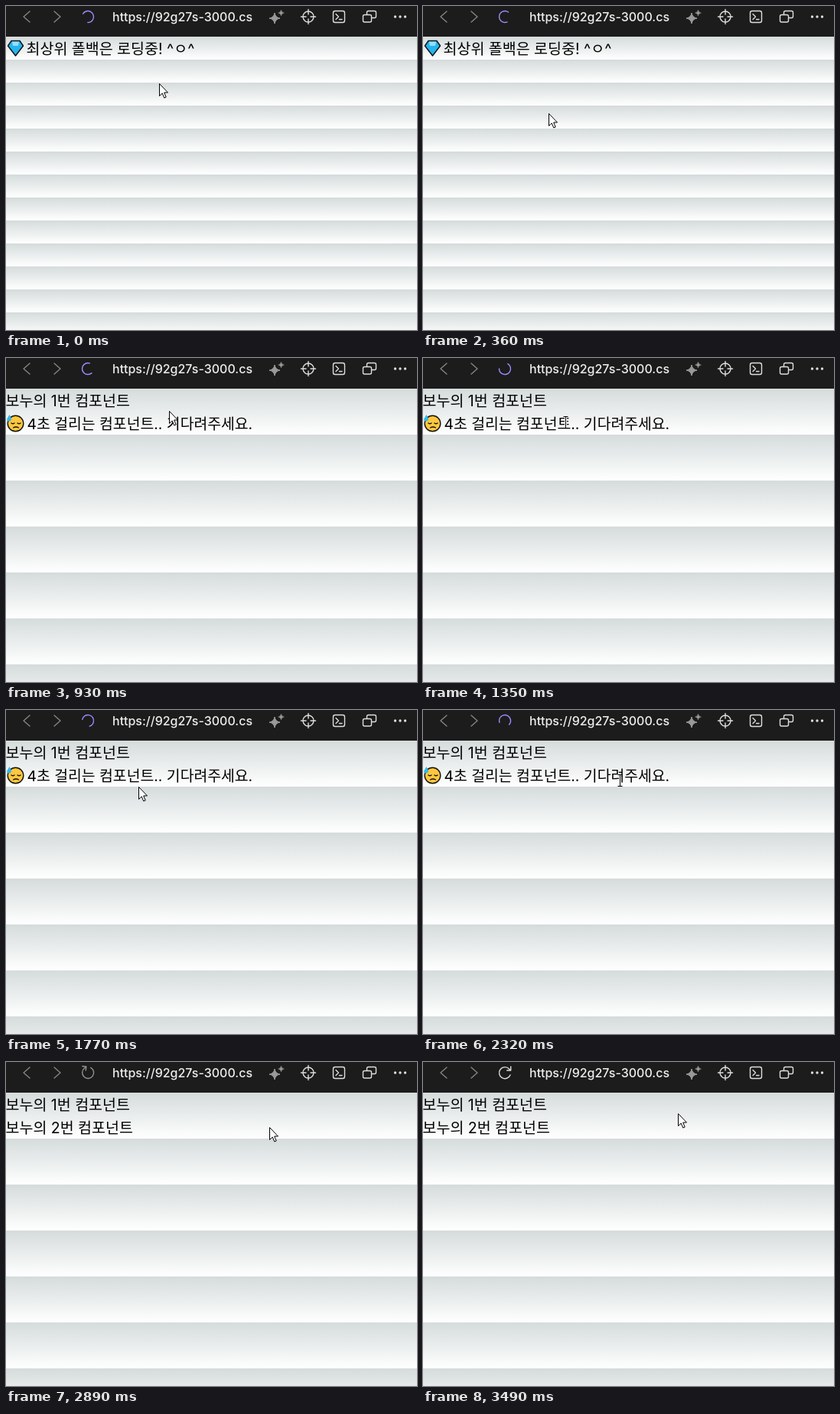
Write an HTML page that moves like this. It is 537 px wide and 423 px high and loops after 3580 ms.

```html
<!DOCTYPE html>
<html lang="ko">
<head>
<meta charset="utf-8">
<style>
  html, body { margin: 0; width: 100%; height: 100%; overflow: hidden; }
  body { background: linear-gradient(#d5dbdb, #fff) 0 40px / 100% 30px; }
  svg { display: block; font: 19.5px Inter, "Noto Sans CJK KR", "Noto Sans CJK", sans-serif; }
  .line { fill: none; stroke: #dedede; stroke-width: 1.4; stroke-linecap: round; stroke-linejoin: round; }
  .dim { stroke: #858585; }
  .ink { stroke: #111; stroke-width: 1.4; stroke-linejoin: round; stroke-linecap: round; }
  #spinner { stroke: #9d8cff; }
</style>
</head>
<body>
<svg width="537" height="423">
  <defs>
    <path id="star" d="M0 -7Q1 -1 7 0Q1 1 0 7Q-1 1 -7 0Q-1 -1 0 -7Z"/>
    <path id="chevron" d="M4 -7L-4 0L4 7"/>
  </defs>

  <rect width="537" height="40" fill="#1c1c1c"/>
  <g class="line">
    <use class="dim" href="#chevron" x="27" y="14"/>
    <use class="dim" href="#chevron" transform="translate(67 14) scale(-1 1)"/>
    <circle id="spinner" r="7.5" pathLength="3" stroke-dasharray="2 1"/>
    <path id="reload" d="M7 3A7.5 7.5 0 1 1 5.5 -5L7.5 -3M7.7 -8V-3H2.7"/>
    <g id="target" transform="translate(395 14)"><circle r="7"/></g>
    <g transform="translate(435 14)">
      <rect x="-7.5" y="-7.500" width="15" height="15" rx="2.5"/>
      <path d="M-4 -3.500L-.5 0L-4 3.500M.5 3.500H4"/>
    </g>
    <rect x="471.5" y="6.5" width="12" height="9" rx="2"/>
    <rect x="466.5" y="11.5" width="11" height="9.5" rx="2" fill="#1c1c1c"/>
    <path d="M508.500 14H522" stroke-width="3.4" stroke-dasharray="0 6.500" style="stroke-width:3.4"/>
  </g>
  <g fill="#999" stroke="#999">
    <use href="#star" x="351" y="16"/>
    <use href="#star" transform="translate(359.500 9) scale(.55)"/>
  </g>
  <text x="139" y="20" font-size="16" font-weight="500" fill="#eee">https://92g27s-3000.cs</text>

  <g id="fallback">
    <path class="ink" fill="#26b4ee" d="M7 45.500H18L22.500 52L12.500 65L2.500 52Z"/>
    <path fill="#8fe0ff" d="M8 46.500H17L16 52H9Z"/>
    <text x="26.5" y="62.5">최상위 폴백은 로딩중! ^ㅇ^</text>
  </g>
  <text id="first" x="-.5" y="62.5">보누의 1번 컴포넌트</text>
  <g id="waiting">
    <circle class="ink" cx="12.5" cy="85.5" r="10.3" fill="#ffc83d"/>
    <path class="ink" fill="none" d="M7 85Q9 86.500 11 85M15 85Q17 86.500 19 85M9.500 91Q13 89 16.500 91"/>
    <path fill="#2fb8f0" d="M4.500 74Q9 81 5 82.500Q0 83 1.500 79Z"/>
    <text x="27.5" y="92.5" font-size="19.35">4초 걸리는 컴포넌트.. 기다려주세요.</text>
  </g>
  <text id="second" x="-.5" y="92.5">보누의 2번 컴포넌트</text>

  <path id="arrow" fill="#fff" stroke="#000" d="M.5 .5V16.500L4.200 13L6.800 19L9.200 18L6.700 12H11.500Z"/>
  <g id="beam" fill="none">
    <path stroke="#fff" stroke-width="3" d="M0 -7.500V7.500"/>
    <path stroke="#000" d="M-3 -7.500H3M0 -7V7M-3 7.500H3"/>
  </g>
</svg>
<script>
const LOOP = 3580, FIRST_READY = 820, ALL_READY = 2800, RELOAD_REST = 3190;
const $ = id => document.getElementById(id);
const show = (id, on) => $(id).style.display = on ? '' : 'none';
const place = (id, x, y, turn = 0) =>
  $(id).setAttribute('transform', `translate(${x} ${y}) rotate(${turn})`);
const ease = k => k * k * (3 - 2 * k);

// Crosshair ticks
for (let turn = 0; turn < 360; turn += 90)
  $('target').insertAdjacentHTML('beforeend', `<path d="M3 0H9.500" transform="rotate(${turn})"/>`);

// Where the pointer pauses or turns
const stops = [
  { t: 0, x: 200, y: 101 },
  { t: 300, x: 165, y: 142 },
  { t: 720, x: 155, y: 106 },
  { t: 930, x: 213, y: 69 },
  { t: 1620, x: 173, y: 92 },
  { t: 1770, x: 173, y: 100 },
  { t: 2170, x: 173, y: 100 },
  { t: 2320, x: 257, y: 92 },
  { t: 2720, x: 267, y: 111 },
  { t: 2890, x: 344, y: 85 },
  { t: 3200, x: 339, y: 60 },
  { t: 3310, x: 339, y: 60 },
  { t: 3490, x: 333, y: 67 }
];

function pointerAt(t) {
  const next = stops.findIndex(s => s.t > t);
  if (next < 0) return stops[stops.length - 1];
  const a = stops[next - 1], b = stops[next];
  const k = ease((t - a.t) / (b.t - a.t));
  return { x: Math.round(a.x + (b.x - a.x) * k), y: Math.round(a.y + (b.y - a.y) * k) };
}

function draw(t) {
  const started = t >= FIRST_READY, done = t >= ALL_READY;
  document.body.style.backgroundSize = `100% ${started ? 60 : 30}px`;
  show('fallback', !started);
  show('first', started);
  show('waiting', started && !done);
  show('second', done);

  show('spinner', !done);
  show('reload', done);
  place('spinner', 107, 14, 210 + t * 0.6);
  const settle = Math.min(1, (t - ALL_READY) / (RELOAD_REST - ALL_READY));
  place('reload', 107, 14, -110 * (1 - settle));
  $('reload').style.opacity = 0.5 + 0.5 * settle;

  const { x, y } = pointerAt(t);
  const overText = started && y > 73 && y < 98 && x < (done ? 165 : 322);
  show('arrow', !overText);
  show('beam', overText);
  place('arrow', x, y);
  place('beam', x + 0.5, y);
}

const start = performance.now();
function tick() {
  draw((performance.now() - start) % LOOP);
  requestAnimationFrame(tick);
}
tick();
</script>
</body>
</html>
```
